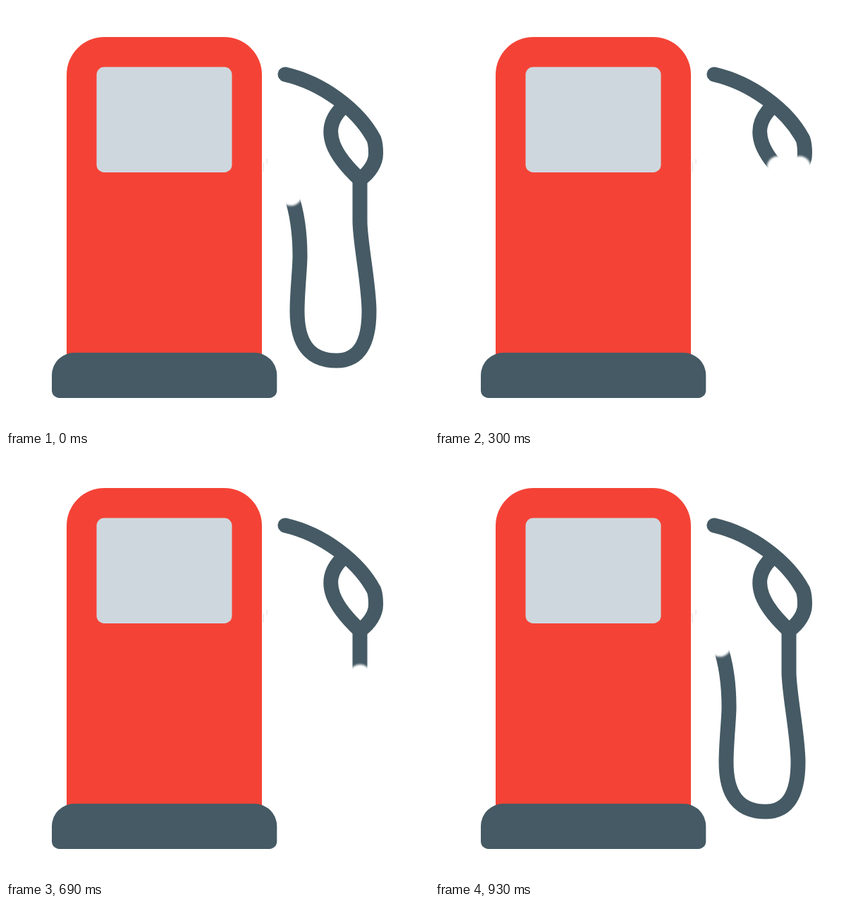
These frames come from a looping animation (600 px wide and 600 px high, 960 ms). An HTML page:

```html
<!DOCTYPE html>
<html lang="en">
<head>
<meta charset="utf-8">
<title>Fuel pump</title>
<style>
  html, body { margin: 0; width: 100%; height: 100%; overflow: hidden; background: #fff; }
  svg { display: block; width: 100vw; height: 100vh; }
  .hose, #eraser { fill: none; stroke-linecap: round; stroke-linejoin: round; }
  .hose { stroke: #455a64; stroke-width: 21; }
  #eraser { stroke: #fff; stroke-width: 32; filter: blur(1.7px); }
</style>
</head>
<body>
<svg viewBox="0 0 600 600">
  <g class="hose">
    <path d="M404 267C412 290 417 318 417 355C417 372 413 405 413 433C413 478 430 503 469 503C500 503 515 479 515 433C515 395 502 335 502 305V248" />
    <path d="M396 97C448 109 499 146 522 189C524 195 524.500 200 524.500 208C525 222 516 236 502 246C486 231 470 212 464 196C458 179 459 163 475 146" />
  </g>
  <g id="eraser"></g>
  <path d="M365 222v13M370 217v7" stroke="#eee" stroke-width="2" />
  <path d="M86 500V97.500a53.500 53.500 0 0 1 53.500-53.500H309.500a53.500 53.500 0 0 1 53.500 53.500V500z" fill="#f44336" />
  <rect x="128.500" y="86.500" width="192" height="149.500" rx="10.700" fill="#cfd7de" />
  <path d="M65 545.300V523.700a32 32 0 0 1 32-32H352.300a32 32 0 0 1 32 32V545.300a10.700 10.700 0 0 1-10.700 10.700H75.700a10.700 10.700 0 0 1-10.700-10.700z" fill="#455a64" />
</svg>
<script>
  const STEP = 30, LOOP = 960, LAST = 14;

  // Each stretch is rubbed out between two steps: [path, from, to]
  const stretches = [
    ['M404 267C412 290 417 318 417 355C417 372 413 405 413 433C413 478 430 503 469 503C486 503 498 496 506 483', 0, 4],
    ['M506 483C512 472 515 455 515 433C515 395 502 335 502 305V247C509 242 514 236 517 229', 4, 10],
    ['M517 229C524 216 525 206 523 198', 10, 11],
    ['M523 198L522 189C499 146 448 109 394 96', 11, 14],
    ['M500 246L487 229', 9.3, 10],
    ['M487 229C478 218 470 207 465 196C459 184 459 174 462 166', 10, 11],
    ['M462 166L471 152', 11, 12]
  ].map(([d, from, to]) => {
    const path = document.createElementNS('http://www.w3.org/2000/svg', 'path');
    path.setAttribute('d', d);
    path.setAttribute('pathLength', 1);
    document.getElementById('eraser').append(path);
    return { path, from, to };
  });

  function draw() {
    const tick = Math.floor(performance.now() % LOOP / STEP);
    const step = Math.min(tick, LAST, LOOP / STEP - 1 - tick);
    for (const { path, from, to } of stretches) {
      const done = Math.min(1, Math.max(0.001, (step - from) / (to - from)));
      path.style.display = step >= from ? '' : 'none';
      path.style.strokeDasharray = `${done} 9`;
    }
    requestAnimationFrame(draw);
  }
  draw();
</script>
</body>
</html>
```
